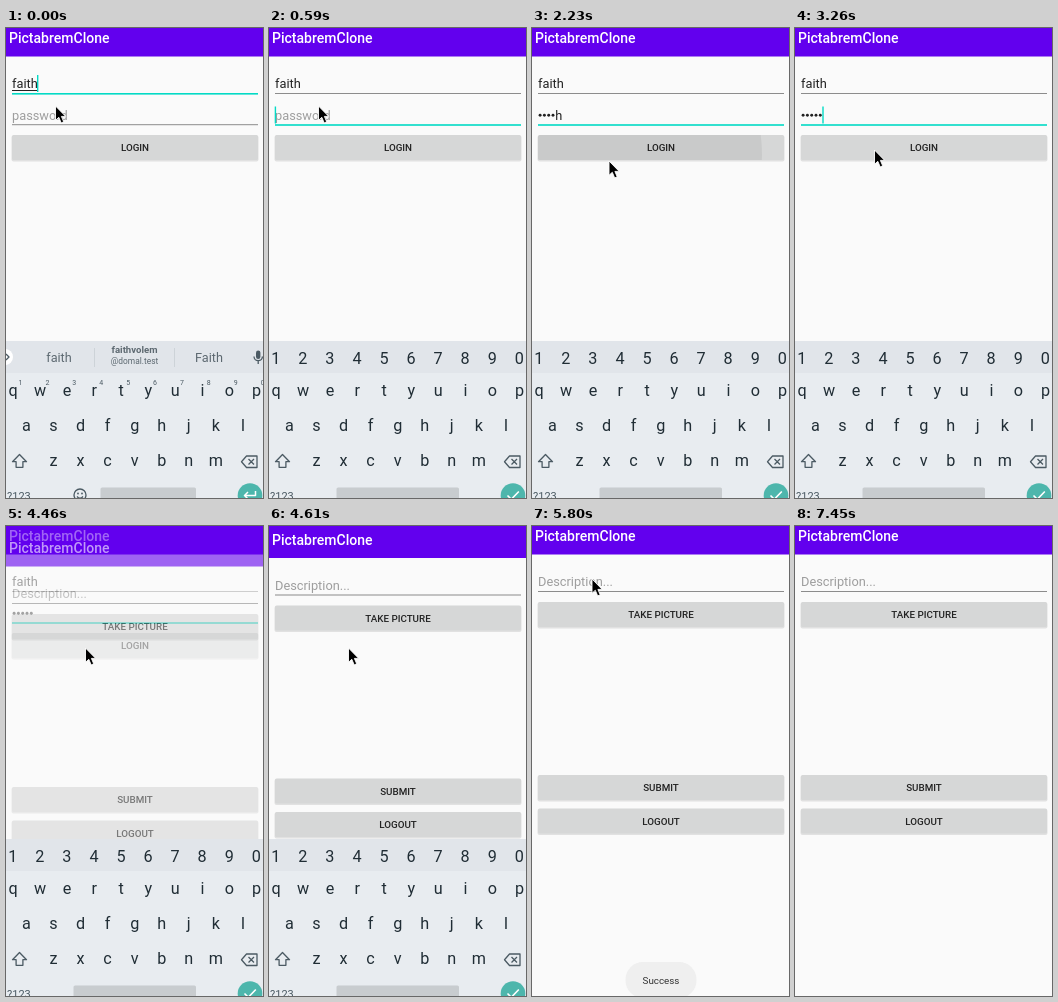
These frames come from a looping animation (257x470 px, 8000 ms). An HTML page:

```html
<!DOCTYPE html>
<html lang="en">
<head>
<meta charset="utf-8">
<title>Login and post screens</title>
<style>
  html, body { margin: 0; width: 100%; height: 100%; overflow: hidden; background: #fafafa; }
  svg { display: block; width: 100vw; height: 100vh; }
  text { font-family: Roboto, "Open Sans", sans-serif; }
</style>
</head>
<body>
<svg id="stage" viewBox="0 0 257 470"></svg>
<script>
const LOOP = 8000;
const TEAL = '#03dac5', INK = '#222', KEY = '#202d35', ICON = '#4b5a63';
const USER = 'faith';

const rect = (x, y, w, h, fill, extra = '') =>
  `<rect x="${x}" y="${y}" width="${w}" height="${h}" fill="${fill}" ${extra}/>`;
const label = (x, y, size, fill, str, extra = '') =>
  `<text x="${x}" y="${y}" font-size="${size}" fill="${fill}" ${extra}>${str}</text>`;
const centered = (x, y, size, fill, str, extra = '') =>
  label(x, y, size, fill, str, `text-anchor="middle" ${extra}`);
const stroke = (d, color = ICON, width = 1.3) =>
  `<path d="${d}" fill="none" stroke="${color}" stroke-width="${width}" stroke-linejoin="round"/>`;
const group = (id, body) => `<g id="${id}">${body}</g>`;

const header = () =>
  rect(0, -40, 257, 68.5, '#6200ee') +
  label(3, 15, 14, '#fff', 'PictabremClone', 'font-weight="500"');

const button = (y, str) =>
  rect(5.5, y + .6, 247, 25.8, '#000', 'rx="2" opacity=".1"') +
  rect(6, y, 246, 25, '#d6d7d7', 'rx="1.5"') +
  centered(129, y + 16.4, 9.8, INK, str, 'font-weight="500"');

const underline = (id, y) => `<rect id="${id}" x="6" y="${y}" width="246" height="1"/>`;

const loginScreen = () =>
  rect(0, 0, 257, 470, '#fafafa') + header() +
  label(6, 60.3, 12.8, INK, USER) +
  rect(6, 62, 26, 1, INK, 'id="composing"') +
  underline('userLine', 65) +
  label(6, 91.8, 12.8, '#9e9e9e', 'password', 'id="hint"') +
  group('secret', '') +
  underline('passLine', 96.2) +
  rect(0, 0, 1.4, 17, TEAL, 'id="caret"') +
  button(107, 'LOGIN') +
  '<clipPath id="buttonClip"><rect x="6" y="107" width="246" height="25" rx="1.5"/></clipPath>' +
  '<circle id="ripple" cx="85" cy="126" r="145" opacity=".06" clip-path="url(#buttonClip)"/>';

const postScreen = () =>
  rect(0, 0, 257, 480, '#fafafa') + header() +
  label(6, 60.3, 12.8, '#9e9e9e', 'Description...') +
  rect(6, 65, 246, 1, '#8c8c8c') +
  button(76, 'TAKE PICTURE') + button(249, 'SUBMIT') + button(282.5, 'LOGOUT');

const keyRow = (chars, x, y) =>
  [...chars].map((c, i) => centered(x + 27.05 * i, y, 16.2, KEY, c)).join('');

const suggestions = () =>
  '<circle cx="-1" cy="329" r="8" fill="#fff"/>' + stroke('M0 326l3 3l-3 3') +
  centered(53, 333.6, 12.7, '#5d6971', USER) +
  centered(128.5, 324.6, 9.6, '#5d6971', 'faithvolem', 'font-weight="700"') +
  centered(128.5, 335.6, 8.4, '#5d6971', '@domal.test') +
  centered(203, 333.6, 12.7, '#5d6971', 'Faith') +
  rect(88, 320, 1, 19, '#cdd3d8') + rect(168, 320, 1, 19, '#cdd3d8') +
  rect(250, 322.5, 4.4, 8.5, ICON, 'rx="2.2"') + stroke('M248 328.5a4.2 4.2 0 0 0 8.4 0M252.2 333v3');

const smallDigits = () =>
  [...'1234567890'].map((c, i) => centered(14.5 + 26.9 * i, 357, 7, ICON, c)).join('');

const textKeys = () =>
  suggestions() + smallDigits() +
  rect(94.5, 459.5, 95.5, 16, '#c8cccf', 'rx="1.5"') +
  '<circle cx="74" cy="467" r="6" fill="none" stroke="#4b5a63" stroke-width="1.3"/>' +
  '<circle cx="72" cy="465.5" r=".9" fill="#4b5a63"/><circle cx="76" cy="465.5" r=".9" fill="#4b5a63"/>' +
  stroke('M71 468.5q3 3.5 6 0');

const passwordKeys = () =>
  keyRow('1234567890', 6.8, 335.7) + rect(67.5, 459.5, 122.5, 16, '#c8cccf', 'rx="1.5"');

const keyboard = () =>
  rect(0, 313, 257, 160, '#e8ecf0') + rect(0, 313, 257, 32, '#e1e5ea') +
  keyRow('qwertyuiop', 7, 367.6) + keyRow('asdfghjkl', 20.5, 402.8) + keyRow('zxcvbnm', 47.5, 438) +
  stroke('M13.5 426.5l7 7.2h-3.6v5.6h-6.8v-5.6H6.5z') +
  stroke('M240.5 428H251v11.5h-10.5l-5-5.75zM242.5 431l5.5 5.5m0-5.5l-5.5 5.5') +
  label(1, 471.5, 11, ICON, '?123') +
  '<circle cx="244" cy="467.5" r="12.3" fill="#4db6ac"/>' +
  group('textKeys', textKeys() + stroke('M249.5 463v4.5h-11m3.5-3.5l-3.5 3.5l3.5 3.5', '#fff', 1.5)) +
  group('passwordKeys', passwordKeys() + stroke('M238.5 467.5l3.8 3.8l7.5-7.8', '#fff', 1.6));

const toast = () =>
  rect(93.5, 436, 71, 36, '#efefef', 'rx="17.5"') + centered(129, 457.7, 9.8, '#333', 'Success');

const pointer = () =>
  '<path d="M0 0V14.3L3.3 11.3L5.7 16.9L8.2 15.8L5.9 10.4H10.2Z" fill="#000" stroke="#fff" stroke-width=".9"/>';

document.getElementById('stage').innerHTML =
  group('login', loginScreen()) + group('post', postScreen()) +
  group('keyboard', keyboard()) + group('toast', toast()) + group('pointer', pointer());

const el = Object.fromEntries([...document.querySelectorAll('[id]')].map(n => [n.id, n]));
const show = (node, on) => node.setAttribute('display', on ? 'inline' : 'none');
const fade = (node, alpha) => { show(node, alpha > 0); node.setAttribute('opacity', alpha); };
const move = (node, x, y) => node.setAttribute('transform', `translate(${x} ${y})`);

// Each step is [start, ...values]; the last one already begun holds.
const hold = (steps, t) => steps.filter(s => s[0] <= t).pop().slice(1);

const pointerPath = [
  [0, 49.5, 78], [1780, 52, 84], [1930, 62, 106], [2080, 74, 129], [2220, 77, 133],
  [2370, 79, 126], [2520, 79.5, 122], [5210, 76, 104], [5350, 66, 62], [5500, 62, 45],
  [5650, 61, 49], [5800, 60, 53], [6100, 69, 385], [6250, 75, 449], [6400, 75, 490]
];
const caretBlink = [[0, 1], [740, 1], [1780, 0], [2370, 1], [2810, 0], [3260, 1], [3860, 0]];
const typed = [[0, 0], [890, 1], [1040, 2], [1190, 4], [1340, 5]];
const postEntry = [[0, 0, 0], [4460, 12, .6], [4610, 3.5, 1], [4760, 0, 1]];
const keyboardExit = [[0, 0, 1], [4910, 3, .95], [5060, 13, .65], [5210, 26, .2], [5350, 30, 0]];
const toastAlpha = [[0, 0], [4910, .35], [5060, .85], [5210, 1], [7150, .65], [7300, .3], [7450, 0]];

function drawSecret(t) {
  const [count] = hold(typed, t);
  const masked = t >= 2810 ? count : Math.max(0, count - 1);
  let body = '';
  for (let i = 0; i < masked; i++) body += `<circle cx="${8.1 + 4.3 * i}" cy="87.2" r="1.45" fill="${INK}"/>`;
  if (count > masked) body += label(6 + 4.3 * masked, 91.8, 12.8, INK, USER[masked]);
  el.secret.innerHTML = body;
  const lastWidth = count > masked ? [4.4, 7, 3.1, 4.2, 7.1][masked] : 0;
  return 6 + 4.3 * masked + lastWidth;
}

function render(t) {
  const onPassword = t >= 300;
  show(el.composing, !onPassword);
  for (const [line, active, y] of [[el.userLine, !onPassword, 65], [el.passLine, onPassword, 96.2]]) {
    line.setAttribute('fill', active ? TEAL : '#8c8c8c');
    line.setAttribute('height', active ? 1.6 : 1);
    line.setAttribute('y', y);
  }
  show(el.hint, t < 890);
  const passCaret = drawSecret(t);
  el.caret.setAttribute('x', onPassword ? passCaret - (t >= 2810 ? .2 : .3) : 31);
  el.caret.setAttribute('y', onPassword ? 78.5 : 47);
  fade(el.caret, hold(caretBlink, t)[0]);
  show(el.ripple, t >= 2220 && t < 2520);

  const [entryY, entryAlpha] = hold(postEntry, t);
  move(el.post, 0, entryY);
  fade(el.post, entryAlpha);

  const numeric = t >= 440;
  show(el.textKeys, !numeric);
  show(el.passwordKeys, numeric);
  fade(el.passwordKeys, t < 440 ? 0 : t < 590 ? .8 : 1);
  const [keysY, keysAlpha] = hold(keyboardExit, t);
  move(el.keyboard, 0, keysY);
  fade(el.keyboard, keysAlpha);

  fade(el.toast, hold(toastAlpha, t)[0]);
  move(el.pointer, ...hold(pointerPath, t));
}

const start = performance.now();
function tick() {
  render((performance.now() - start) % LOOP);
  requestAnimationFrame(tick);
}
tick();
</script>
</body>
</html>
```
